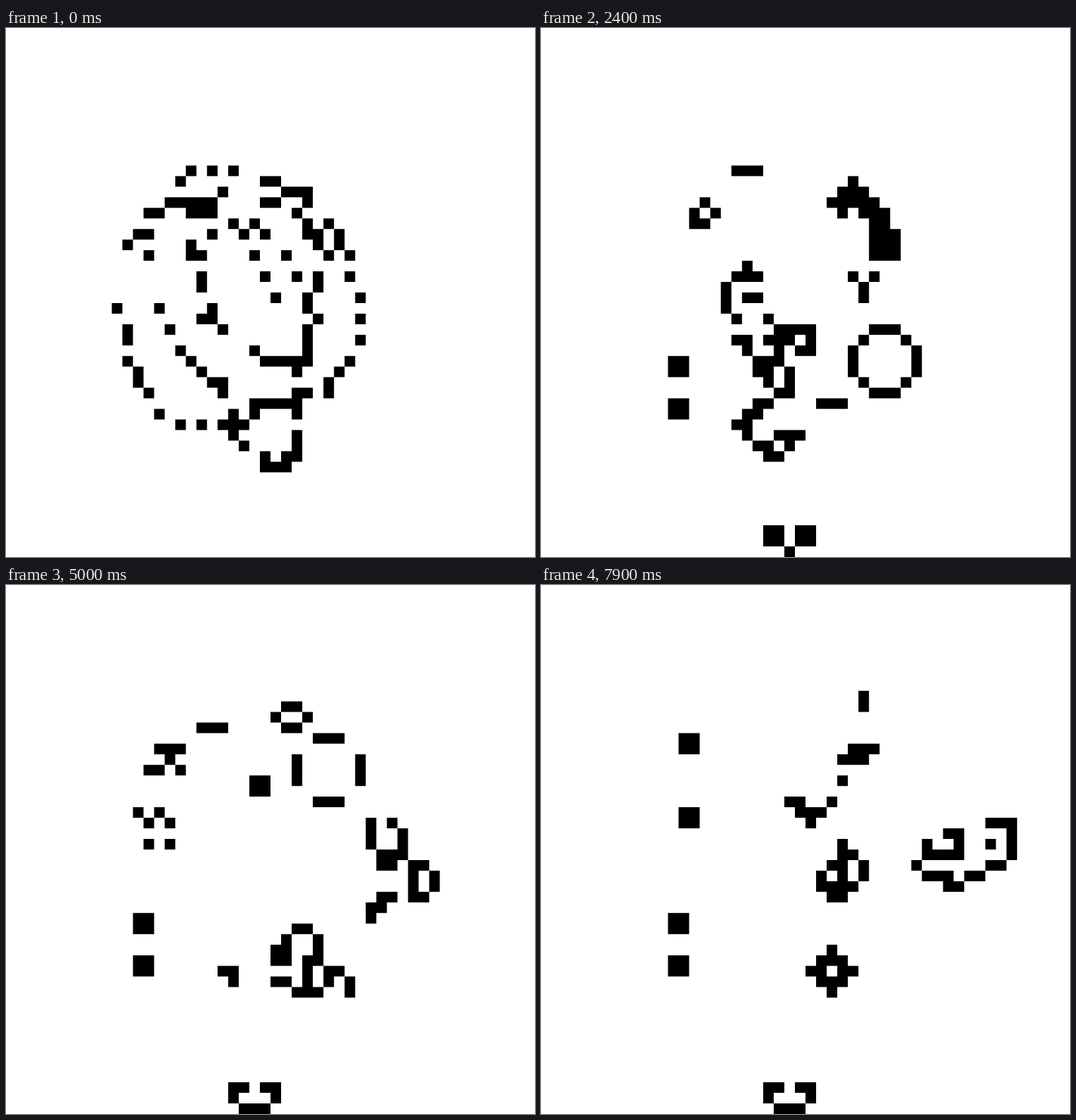
These frames come from a looping animation (748 by 748 pixels, 8 s). An HTML page with a canvas:

```html
<!DOCTYPE html>
<html lang="en">
<head>
<meta charset="utf-8">
<title>Cellular automaton</title>
<style>
  html, body { margin: 0; width: 100%; height: 100%; overflow: hidden; background: #fff; }
  canvas { display: block; }
</style>
</head>
<body>
<canvas id="stage" width="748" height="748"></canvas>
<script>
const SIZE = 748, GRID = 50, CELL = SIZE / GRID;
const STEP = 100, STEPS = 80;

// Live columns of the starting colony, one entry per row from TOP down.
const TOP = 13;
const colony = [
  '17 19 21',
  '16 24-25',
  '20 26-28',
  '15-19 24-25 28',
  '13-14 17-19 27',
  '21 23 28 30',
  '12-13 19 22 24 28-29 31',
  '11 17 29 31',
  '13 17-18 23 26 30 32',
  '',
  '18 24 27 29 32',
  '18 29',
  '25 28 33',
  '10 14 19 28',
  '18-19 29 33',
  '11 15 20 28',
  '11 28 33',
  '16 23 28',
  '11 17 24-28 32',
  '12 18 27 31',
  '12 19-20 30',
  '13 20 27-28 30',
  '23-27',
  '14 21 23 27',
  '16 18 20-22',
  '21 27',
  '22 27',
  '24 26-27',
  '24-26'
];

const emptyGrid = () => Array.from({ length: GRID }, () => new Uint8Array(GRID));

function seed() {
  const grid = emptyGrid();
  colony.forEach((row, i) => {
    for (const run of row.split(' ').filter(Boolean)) {
      const [from, to = from] = run.split('-').map(Number);
      grid[TOP + i].fill(1, from, to + 1);
    }
  });
  return grid;
}

// Everything beyond the grid counts as dead.
function neighbours(grid, x, y) {
  let n = -grid[y][x];
  for (let j = Math.max(0, y - 1); j <= Math.min(GRID - 1, y + 1); j++)
    for (let i = Math.max(0, x - 1); i <= Math.min(GRID - 1, x + 1); i++)
      n += grid[j][i];
  return n;
}

function evolve(grid) {
  const next = emptyGrid();
  for (let y = 0; y < GRID; y++)
    for (let x = 0; x < GRID; x++) {
      const n = neighbours(grid, x, y);
      next[y][x] = n === 3 || (n === 2 && grid[y][x]) ? 1 : 0;
    }
  return next;
}

const generations = [seed()];
while (generations.length < STEPS)
  generations.push(evolve(generations[generations.length - 1]));

const ctx = document.getElementById('stage').getContext('2d');
ctx.fillStyle = '#000';
// Adding alpha keeps shared cell edges free of seams.
ctx.globalCompositeOperation = 'lighter';

function draw(grid) {
  ctx.clearRect(0, 0, SIZE, SIZE);
  for (let y = 0; y < GRID; y++)
    for (let x = 0; x < GRID; x++)
      if (grid[y][x]) ctx.fillRect(x * CELL, y * CELL, CELL, CELL);
}

let shown = -1;
function tick(time) {
  const step = Math.floor(Math.max(0, time) / STEP + 1e-6) % STEPS;
  if (step !== shown) {
    shown = step;
    draw(generations[step]);
  }
  requestAnimationFrame(tick);
}

draw(generations[0]);
requestAnimationFrame(tick);
</script>
</body>
</html>
```
